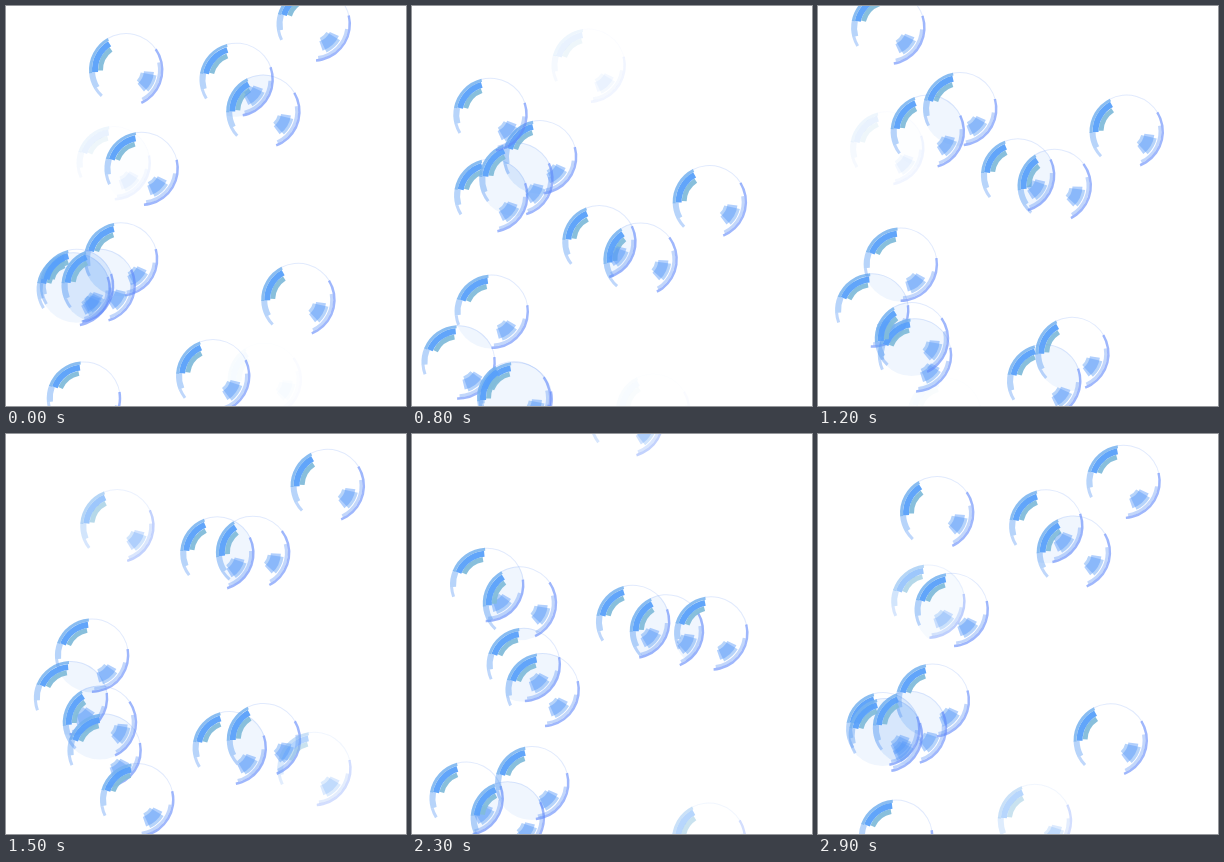
An HTML page with a canvas that plays this animation: 400 px wide and 400 px high, repeating every 3 s.

```html
<!DOCTYPE html>
<html lang="en">
<head>
<meta charset="utf-8">
<title>Bubbles</title>
<style>
  html, body { margin: 0; width: 100%; height: 100%; overflow: hidden; background: #fff; }
  canvas { display: block; width: 400px; height: 400px; }
</style>
</head>
<body>
<canvas id="stage" width="400" height="400"></canvas>
<script>
const ctx = document.getElementById('stage').getContext('2d');
const LOOP = 3000, STEP = 100;
const LIFE = 2690, FADE = 220, INTERVAL = 200, LEAD = 30;
const RADIUS = 37, RAD = Math.PI / 180;
const bubbles = [];

// One bubble is released every INTERVAL ms. Each drifts on a smooth curve
// through a few x and y values evenly spaced over its life.
function release(shine, xs, ys) {
  const birth = bubbles.length * INTERVAL - LEAD;
  bubbles.push({ birth, turn: (shine - 180) * RAD, xs, ys });
}

release(205, [243, 230, 253, 268], [347, 160, -95]);
release(234, [57, 52, 76, 58], [406, 264, 106]);
release(230, [112, 97, 108, 112], [415, 295, 178]);
release(207, [102, 94, 107, 120], [392, 229, 64]);
release(211, [249, 258, 254, 262], [376, 224, 80]);
release(222, [226, 221, 224, 244], [375, 242, 132, -14]);
release(228, [130, 131, 133, 161], [380, 229, 85]);
release(228, [306, 302, 336], [322, 103, -260]);
release(222, [62, 57, 74, 76], [422, 295, 166]);
release(226, [127, 115, 120, 142], [392, 240, 103]);
release(216, [98, 92, 102, 111], [400, 238, 103]);
release(210, [296, 292, 299, 327], [385, 278, 186, 22]);
release(232, [79, 79, 90], [432, 317, 183]);
release(223, [64, 77, 30], [322, 87, -155]);
release(216, [207, 186, 210, 218], [370, 186, 3]);

// Lagrange polynomial through evenly spaced values, u from 0 to 1.
function curve(values, u) {
  const s = u * (values.length - 1);
  return values.reduce((sum, value, i) =>
    sum + values.reduce((term, _, j) => j === i ? term : term * (s - j) / (i - j), value), 0);
}

function band(inner, outer, from, to, color) {
  ctx.beginPath();
  ctx.arc(0, 0, outer, from * RAD, to * RAD);
  ctx.arc(0, 0, inner, to * RAD, from * RAD, true);
  ctx.fillStyle = color;
  ctx.fill();
}

function disc(x, y) {
  ctx.beginPath();
  ctx.arc(x, y, RADIUS, 0, Math.PI * 2);
}

function drawBubble({ x, y, turn, alpha }) {
  ctx.save();
  ctx.translate(x, y);
  ctx.rotate(turn);
  ctx.globalAlpha = alpha;

  // rim
  band(36, 37, 212, 300, 'rgba(105,150,245,.2)');
  band(31, 37, 122, 149, 'rgba(95,160,245,.45)');
  band(34, 37, 106, 122, 'rgba(95,155,245,.4)');
  band(35, 37.5, -62, 38, 'rgba(95,135,250,.6)');
  band(32, 35, -40, 34, 'rgba(105,155,245,.4)');

  // shine
  band(23, 28, 152, 207, 'rgba(130,188,218,.95)');
  band(28, 34, 149, 211, 'rgba(88,160,250,.95)');
  band(34, 37, 148, 213, 'rgba(118,178,238,.85)');

  // reflected spot
  band(15, 31, -17, 17, 'rgba(95,160,245,.45)');
  band(18, 28, -23, 23, 'rgba(85,150,250,.45)');
  ctx.restore();
}

function tintOverlap(a, b) {
  if (Math.hypot(a.x - b.x, a.y - b.y) >= 2 * RADIUS) return;
  ctx.save();
  disc(a.x, a.y);
  ctx.clip();
  disc(b.x, b.y);
  ctx.globalAlpha = 0.1 * a.alpha * b.alpha;
  ctx.fillStyle = '#6eaaf0';
  ctx.fill();
  ctx.restore();
}

function poseAt(now, { birth, turn, xs, ys }) {
  const age = (now - birth + LOOP) % LOOP;
  const u = (age - INTERVAL - LEAD) / (INTERVAL * 11);
  const fade = Math.max(0, Math.min(1, age / FADE, (LIFE - age) / FADE));
  return { x: curve(xs, u), y: curve(ys, u), turn, alpha: fade ** 1.5 };
}

function render(time) {
  const now = Math.floor((time % LOOP) / STEP) * STEP;
  ctx.fillStyle = '#fff';
  ctx.fillRect(0, 0, 400, 400);

  const alive = bubbles.map(b => poseAt(now, b)).filter(p => p.alpha > 0);
  alive.forEach((a, i) => alive.slice(i + 1).forEach(b => tintOverlap(a, b)));
  alive.forEach(drawBubble);
}

const start = performance.now();
function frame() {
  render(performance.now() - start);
  requestAnimationFrame(frame);
}
frame();
</script>
</body>
</html>
```
